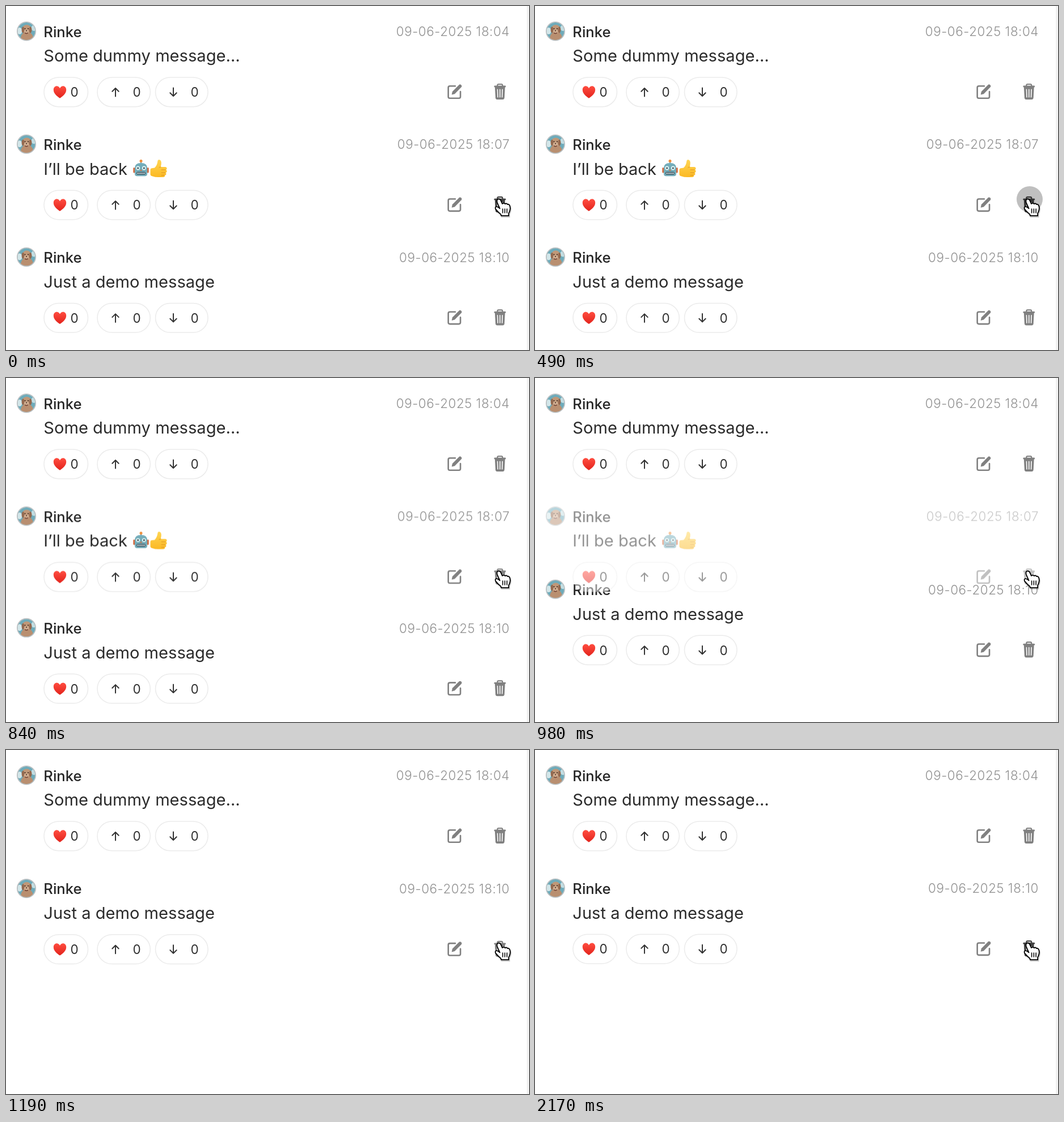
Recreate the animation shown at these times as an HTML page. Size 922x607 px, loop 2800 ms.

```html
<!DOCTYPE html>
<html lang="en">
<head>
<meta charset="utf-8">
<title>Deleting a message</title>
<style>
  html, body { margin: 0; width: 100%; height: 100%; overflow: hidden; background: #fff; }
  svg { display: block; width: 100vw; height: 100vh; }
  text { font-family: Inter, "Noto Sans", sans-serif; font-optical-sizing: none; fill: #2b2b2b; }
  .name { font-size: 25.6px; font-weight: 500; fill: #262626; }
  .message { font-size: 29.1px; }
  .date { font-size: 22.5px; font-weight: 300; letter-spacing: .49px; fill: #929292; text-anchor: end; }
  .count { font-size: 22.5px; fill: #333; text-anchor: middle; }
  .line { fill: none; stroke-linecap: round; stroke-linejoin: round; }
</style>
</head>
<body>
<svg viewBox="0 0 922 607">
  <defs>
    <clipPath id="round"><circle cx="36" cy="44.5" r="15.6"/></clipPath>
    <linearGradient id="red" x2="0" y2="1">
      <stop stop-color="#ff4d40"/><stop offset="1" stop-color="#e2231c"/>
    </linearGradient>
    <linearGradient id="yellow" x2="0" y2="1">
      <stop stop-color="#ffd552"/><stop offset="1" stop-color="#fbb924"/>
    </linearGradient>

    <g id="avatar">
      <g clip-path="url(#round)">
        <rect x="19" y="27" width="34" height="35" fill="#6eabba"/>
        <ellipse cx="24" cy="44" rx="4.5" ry="6" fill="#d3e6e9"/>
        <ellipse cx="49" cy="39" rx="4.5" ry="5" fill="#c2dee3"/>
        <ellipse cx="37" cy="58" rx="11" ry="13" fill="#b98f70"/>
        <ellipse cx="36.5" cy="41" rx="8" ry="7.8" fill="#c09878"/>
        <ellipse cx="30" cy="42" rx="2.4" ry="5.5" fill="#94694f"/>
        <ellipse cx="43" cy="42" rx="2.4" ry="5.5" fill="#94694f"/>
        <ellipse cx="36" cy="45" rx="4.2" ry="3.6" fill="#d0ad90"/>
        <path d="M33.5 40h.1M39 40h.1M36 43.5h.1" class="line" stroke="#402b22" stroke-width="2"/>
        <path d="M33.5 47.5q2.5 2 5 0" class="line" stroke="#6f4032" stroke-width="1.4"/>
      </g>
      <circle cx="36" cy="44.5" r="16.2" fill="none" stroke="#b9bec0" stroke-width="1.6"/>
    </g>

    <path id="heart" fill="url(#red)" d="M95 162.7C90.5 160 83.8 154.6 83.8 148.1C83.8 140.3 92.3 139.2 95 145.2C97.7 139.2 106.2 140.3 106.2 148.1C106.2 154.6 99.5 160 95 162.7Z"/>
    <path id="arrow" class="line" stroke="#333" stroke-width="2" d="M0 7.5V-7M-5.7-1.3L0-7L5.7-1.3"/>

    <g id="edit">
      <path class="line" stroke="#808080" stroke-width="2.6" d="M792 141.3H782.5Q779.7 141.3 779.7 144.1V159.9Q779.7 162.7 782.5 162.7H798.3Q801.1 162.7 801.1 159.9V151"/>
      <path fill="#808080" d="M785.7 156.6L786.9 151L798.8 139Q800.4 137.6 802 139L803 140Q804.2 141.5 802.9 143.1L791 155.2Z"/>
    </g>
    <g id="trash">
      <path class="line" stroke="currentColor" stroke-width="2.2" d="M866.3 141V140Q866.3 138 868.3 138H873.3Q875.3 138 875.3 140V141"/>
      <path class="line" stroke="currentColor" stroke-width="2.8" d="M861.8 142H879.8"/>
      <path fill="currentColor" d="M861.8 142H879.8L878.7 162Q878.4 165 875.7 165H865.9Q863.2 165 862.9 162Z"/>
      <path class="line" stroke="#fff" stroke-width="1.6" d="M866.5 147.3L867 160.7M870.8 147.3V160.7M875.1 147.3L874.6 160.7"/>
    </g>

    <g id="robot">
      <path stroke="#8297a0" stroke-width="2" d="M238 274V279"/>
      <circle cx="238" cy="273.6" r="2.5" fill="#ee8f3c"/>
      <path class="line" stroke="#d2693f" stroke-width="3" d="M225.8 286.5V293M250.2 286.5V293"/>
      <path fill="#74adba" d="M227 286Q227 277 238 277Q249 277 249 286V296Q249 300.3 244.7 300.3H231.3Q227 300.3 227 296Z"/>
      <circle cx="232.7" cy="286" r="3.4" fill="#e3f6f5"/>
      <circle cx="243.3" cy="286" r="3.4" fill="#e3f6f5"/>
      <circle cx="232.7" cy="286" r="1.6" fill="#344b57"/>
      <circle cx="243.3" cy="286" r="1.6" fill="#344b57"/>
      <path fill="#cf6c3f" d="M238 288L239.8 291H236.2Z"/>
      <rect x="230.3" y="292.7" width="15.4" height="4.8" rx="1.5" fill="#344b57"/>
      <path stroke="#e3eef0" stroke-width="2.2" stroke-dasharray="2.3 1.2" d="M231.6 295.1H245"/>
    </g>
    <g id="thumb">
      <path fill="url(#yellow)" d="M254.5 289Q254.5 286.5 257 286.2L262 285.6Q266.5 281 267.2 274.5Q267.6 271 270 271.3Q273.8 272 273.8 277Q273.8 280.5 272.6 284H280.5Q283.6 284.2 283.6 286.8Q283.4 288.6 282 289Q284 290 283.6 292Q283.2 294 281.4 294.2Q283 295.4 282.3 297.2Q281.5 298.8 279.7 298.8Q280.6 300 279.7 301Q278.6 302 276 302H268Q262.5 302 258.5 300.5Q254.5 299.5 254.5 297Z"/>
      <path class="line" stroke="#e0951c" stroke-width="1" d="M274 289H281M274 294H280.5M274 298.6H279M270 285Q272 284 273 284"/>
    </g>
    <path id="hand" d="M870.6 357.4L866 347Q864.3 342 867.6 340.7Q870.6 339.8 872.4 343.4L875 349Q877.4 346.6 879.8 349.2Q882.4 347.4 884.4 350.2Q887.3 349.2 888.3 353Q889.4 356.5 888.4 360.5Q887.6 363.5 886.2 365.5V370.2H873L872.4 367.6Q867.3 363.6 863.3 358.6Q861.6 355.4 864 354.2Q866.4 353.4 870.6 357.4Z"/>
  </defs>

  <rect width="922" height="607" fill="#fff"/>
  <rect x="918.5" width="3.5" height="607" fill="#f8f8f8"/>
  <rect x="918.5" width="1.5" height="607" fill="#ececec"/>
  <g id="rows"></g>
  <circle id="ripple" cx="872" cy="341" fill="#000"/>
  <g>
    <use href="#hand" x="1" y="1.8" fill="#000" stroke="#000" stroke-width="2.5" opacity=".22"/>
    <use href="#hand" fill="#fff" stroke="#000" stroke-width="1.8" stroke-linejoin="round"/>
    <path class="line" stroke="#000" stroke-width="1.5" d="M875.6 358V365M879.4 358V365M883.2 358V365"/>
  </g>
</svg>
<script>
const LOOP = 2800, STEP = 70, ROW_HEIGHT = 199.2;
const AUTHOR = "Rinke";
const messages = [
  { text: "Some dummy message…", time: "18:04" },
  { text: "I’ll be back", time: "18:07", emoji: true },
  { text: "Just a demo message", time: "18:10" }
];
const $ = id => document.getElementById(id);

const pill = (x, width, icon, countX) => `
  <rect x="${x}" y="126" width="${width}" height="51.7" rx="25.8" fill="#fff" stroke="#ebebeb" stroke-width="1.5"/>
  ${icon}<text class="count" x="${countX}" y="160.3">0</text>`;

const row = ({ text, time, emoji }, i) => `<g id="row${i}">
  <use href="#avatar"/>
  <text class="name" x="66.3" y="54.5">${AUTHOR}</text>
  <text class="date" x="888" y="53.3">09-06-2025 ${time}</text>
  <text class="message" x="66.3" y="98.4">${text}</text>
  ${emoji ? `<g transform="translate(0 ${-ROW_HEIGHT})"><use href="#robot"/><use href="#thumb"/></g>` : ""}
  ${pill(67, 77.5, '<use href="#heart"/>', 120.6)}
  ${pill(161, 93.3, '<use href="#arrow" transform="translate(193 152)"/>', 230.5)}
  ${pill(263.5, 92.5, '<use href="#arrow" transform="translate(295 152) scale(1 -1)"/>', 332.5)}
  <use href="#edit"/>
  <use href="#trash" id="trash${i}" color="#808080"/>
</g>`;

// The fading row lies above the one that slides up behind it.
$("rows").innerHTML = [0, 2, 1].map(i => row(messages[i], i)).join("");

const progress = (t, start, duration) => Math.min(1, Math.max(0, (t - start) / duration));
const easeInOut = p => p < .5 ? 4 * p ** 3 : 1 - 4 * (1 - p) ** 3;
const mix = (a, b, p) => a + (b - a) * p;
const place = (i, slot) => $("row" + i).setAttribute("transform", `translate(0 ${slot * ROW_HEIGHT})`);
const shade = (i, darkness) => {
  const v = Math.round(mix(128, 66, darkness));
  $("trash" + i).setAttribute("color", `rgb(${v},${v},${v})`);
};

function render(t) {
  const slide = easeInOut(progress(t, 778, 454));
  const fade = easeInOut(progress(t, 800, 360));
  place(0, 0);
  place(1, 1);
  place(2, 2 - slide);
  $("row1").setAttribute("opacity", 1 - fade);
  shade(1, 1 - progress(t, 630, 210));
  shade(2, progress(t, 1260, 140));

  const press = progress(t, 280, 210), release = progress(t, 490, 210);
  $("ripple").setAttribute("r", mix(mix(15, 23, press), 27, release));
  $("ripple").setAttribute("opacity", .25 * press * (1 - release));
}

function tick(now) {
  render(Math.floor((now % LOOP) / STEP) * STEP);
  requestAnimationFrame(tick);
}
render(0);
requestAnimationFrame(tick);
</script>
</body>
</html>
```
